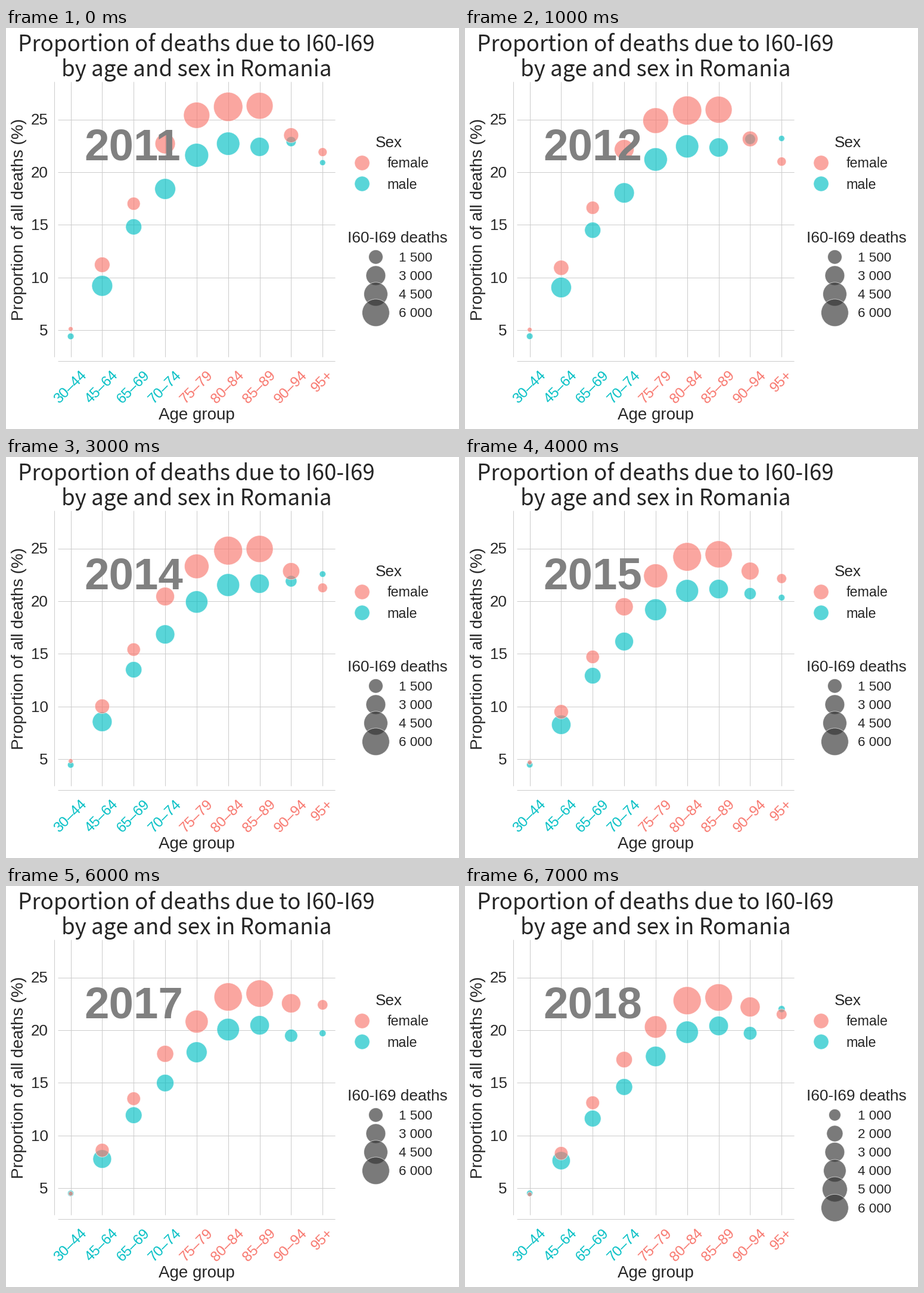
A matplotlib script for the animation above (8 s loop, 760x673 px).

```python
import numpy as np
import matplotlib.pyplot as plt
from matplotlib.animation import FuncAnimation

W, H, DPI = 760, 673, 100
PT = 72 / DPI  # points per pixel
INK, GRID = "#262626", "#cccccc"
FEMALE, MALE = "#f8766d", "#00bfc4"
ALPHA, EDGE = 0.65, 0.9
FIRST, LAST = 2011, 2018

AGES = ["30–44", "45–64", "65–69", "70–74", "75–79",
        "80–84", "85–89", "90–94", "95+"]
N = len(AGES)
AGE_X = 108.55 + 52.83 * np.arange(N)

# Share of deaths (%) by age in the first and last year
FEMALE_ENDS = ([5.1, 11.2, 17, 22.7, 25.4, 26.2, 26.3, 23.5, 21.9],
               [4.4, 8.3, 13.1, 17.2, 20.3, 22.8, 23.1, 22.2, 21.5])
MALE_ENDS = ([4.4, 9.2, 14.8, 18.4, 21.6, 22.7, 22.4, 22.9, 20.9],
             [4.5, 7.6, 11.6, 14.6, 17.5, 19.8, 20.4, 19.7, 22])

# First-year bubble diameters, and their growth over the whole period
FEMALE_SIZE = [7, 25, 21, 33, 43, 48, 44, 24, 14]
MALE_SIZE = [10, 34, 26, 34, 39, 38, 31, 16, 9]
GROWTH = [0.95, 0.87, 1.04, 0.8, 0.85, 0.96, 1.02, 1.35, 1.2]


def shares(ends, swing, t):
    """Half linear, half eased decline; the oldest groups swing most."""
    start, end = map(np.array, ends)
    p = (t + t * t * (3 - 2 * t)) / 2
    wave = swing * 4.0 ** (np.arange(N) - N + 1) * np.sin(2 * np.pi * t)
    return start + (end - start) * p + wave


def diameters(sizes, t):
    return np.array(sizes) * (1 + (np.array(GROWTH) - 1) * t)


def y_of(share):
    return 153.5 + (25 - share) * 17.67


def area(diameter):
    return ((np.asarray(diameter) + 0.8) * PT) ** 2


def deaths_diameter(deaths):
    return np.sqrt(30 + 0.3325 * deaths)


fig = plt.figure(figsize=(W / DPI, H / DPI), dpi=DPI, facecolor="white")
ax = fig.add_axes([0, 0, 1, 1])
ax.set_xlim(0, W)
ax.set_ylim(H, 0)
ax.axis("off")


def label(x, y, text, px, color=INK, font="Liberation Sans", **kw):
    kw.setdefault("va", "baseline")
    return ax.text(x, y, text, fontsize=px * PT, color=color,
                   family=font, zorder=5, **kw)


def rule(x0, y0, x1, y1):
    ax.plot([x0, x1], [y0, y1], color=GRID, lw=PT, zorder=1,
            solid_capstyle="butt")


def bubbles(x, y, diameter, color):
    return ax.scatter(x, y, s=area(diameter), c=color, alpha=ALPHA,
                      edgecolors="white", linewidths=EDGE * PT, zorder=3)


# Titles
for y, line in [(39.5, "Proportion of deaths due to I60-I69"),
                (81.5, "by age and sex in Romania")]:
    label(319.5, y, line, 36.8, font="Noto Sans CJK JP", ha="center")
label(319.5, 657, "Age group", 27.8, ha="center")
label(29.5, 321.5, "Proportion of all deaths (%)", 28, rotation=90,
      rotation_mode="anchor", ha="center")

# Axes and grid
rule(81.2, 90, 81.2, 552)
rule(87, 559.2, 552, 559.2)
for share in range(5, 30, 5):
    y = y_of(share)
    rule(87, y, 552, y)
    label(70.5, y + 9, str(share), 26, ha="right")
for i, (x, age) in enumerate(zip(AGE_X, AGES)):
    rule(x, 90, x, 552)
    label(x, 571.3, age, 24, MALE if i < 4 else FEMALE,
          rotation=45, ha="center", va="top")

# Sex legend
label(642, 200, "Sex", 26, ha="center")
for y, name, color in [(225.9, "female", FEMALE), (260.9, "male", MALE)]:
    bubbles([596.9], [y], [24.5], color)
    label(639.5, y + 8.6, name, 23.2)

# Size legend
label(656.5, 360, "I60-I69 deaths", 26.2, ha="center")
key_y = 384.3 + 31.2 * np.arange(6)
key_dots = bubbles(np.full(6, 620.4), key_y, np.ones(6), "#333333")
key_texts = [label(659, y + 7.4, "", 22.4) for y in key_y]

# Moving parts: men first, women on top
dots = bubbles(np.tile(AGE_X, 2), np.zeros(2 * N), np.ones(2 * N),
               [MALE] * N + [FEMALE] * N)
year_text = label(131.5, 221.5, "", 74.5, "#808080", weight="bold")


def update(frame):
    year = FIRST + frame
    t = frame / (LAST - FIRST)
    year_text.set_text(str(year))

    share = np.append(shares(MALE_ENDS, 2.8, t), shares(FEMALE_ENDS, -1.1, t))
    size = np.append(diameters(MALE_SIZE, t), diameters(FEMALE_SIZE, t))
    dots.set_offsets(np.column_stack([np.tile(AGE_X, 2), y_of(share)]))
    dots.set_sizes(area(size))

    step = 1000 if year in (2016, 2018) else 1500
    deaths = np.arange(step, 6001, step)
    n = len(deaths)
    key_dots.set_offsets(np.column_stack([np.full(n, 620.4), key_y[:n]]))
    key_dots.set_sizes(area(deaths_diameter(deaths)))
    for i, text in enumerate(key_texts):
        text.set_text(f"{deaths[i]:,}".replace(",", " ") if i < n else "")
    return [dots, key_dots, year_text, *key_texts]


anim = FuncAnimation(fig, update, frames=LAST - FIRST + 1, interval=1000,
                     repeat=True, repeat_delay=0, blit=False)
plt.show()
```
